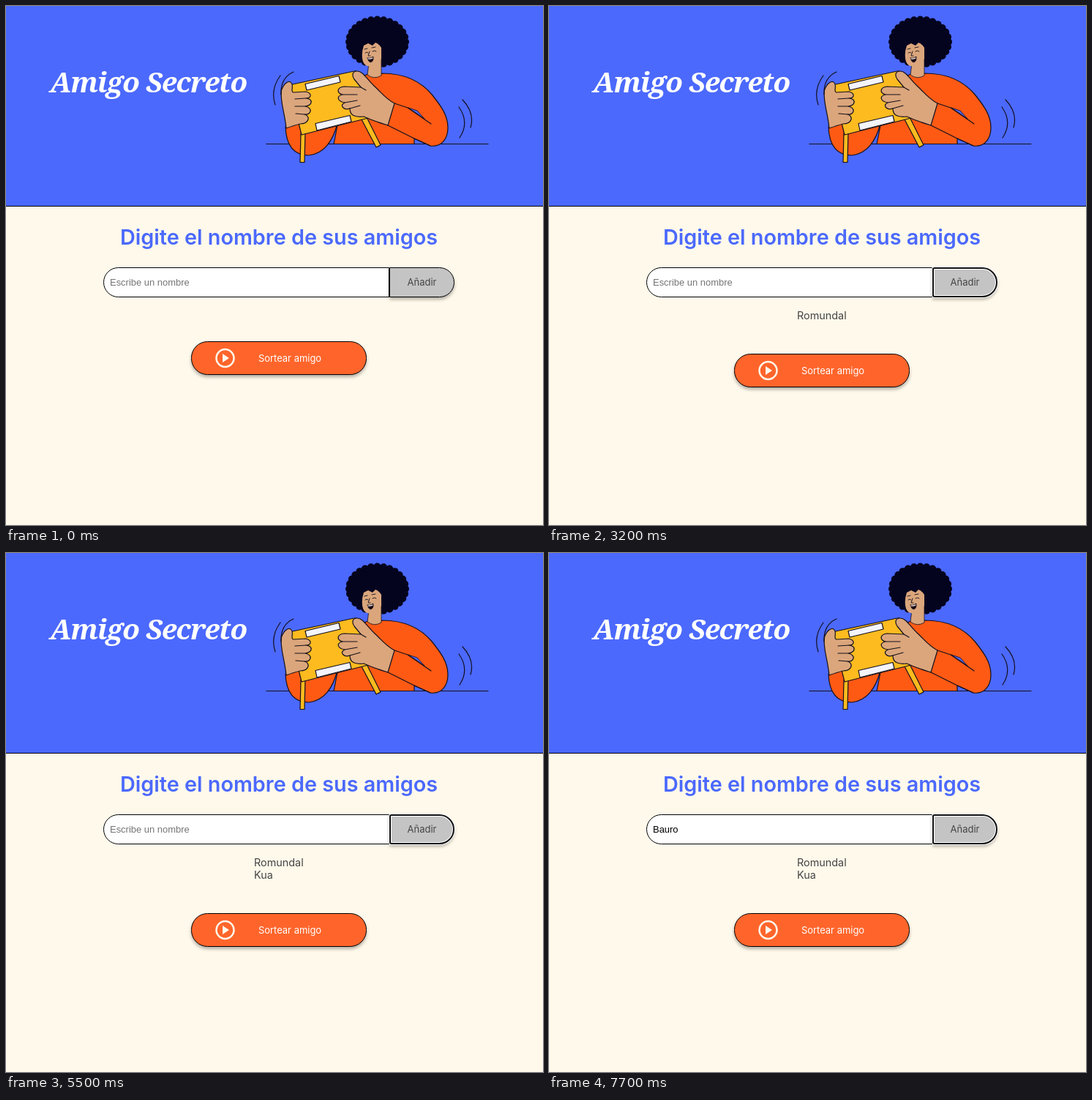
Animation of 734x709 px, one loop 8000 ms. Source, as an HTML page:

```html
<!DOCTYPE html>
<html lang="es">
<head>
<meta charset="utf-8">
<title>Amigo Secreto</title>
<style>
  html, body { margin: 0; width: 100%; height: 100%; overflow: hidden; background: #fff9eb; }
  svg { display: block; width: 734px; height: 709px; }
  text { font-family: Inter, "Noto Sans", sans-serif; font-optical-sizing: none; }
  .title { font: italic 700 39px "Noto Serif", serif; letter-spacing: -1.15px; fill: #fff; }
  .heading { font-size: 28.8px; font-weight: 600; fill: #4b69fd; }
  .label { font-size: 12.96px; }
  .names { font-size: 14.4px; fill: #444; }
  .field { font-family: "Liberation Sans", Arial, sans-serif; font-size: 12.96px; }
  .ghost { font-family: "Liberation Sans", Arial, sans-serif; font-size: 10.7px; }
  .tab { font-family: "Liberation Sans", Arial, sans-serif; font-size: 7.4px; fill: #888; }
  .popup text { font-family: "Open Sans", "Noto Sans", sans-serif; }
  .note { font-size: 9.75px; fill: #666; }
  .saved { font-size: 11px; font-weight: 600; fill: #000; }
  .raised { filter: drop-shadow(0 3px 2px rgba(0, 0, 0, .3)); }
  .art { stroke: #14101c; stroke-width: 1.2; stroke-linejoin: round; stroke-linecap: round; }
  .skin { fill: #dba67c; }
  .shirt { fill: #ff5a14; }
  .box { fill: #fdbb1f; }
  .line { fill: none; }
</style>
</head>
<body>
<svg viewBox="0 0 734 709">
  <rect width="734" height="709" fill="#fff9eb"/>
  <rect width="734" height="273" fill="#4b69fd"/>
  <rect y="273" width="734" height="1" fill="#000"/>
  <text class="title" x="60" y="118">Amigo Secreto</text>

  <g class="art">
    <path class="line" d="M356 188.5H659"/>
    <g id="hair" fill="#05041f" stroke="none"><ellipse cx="507.5" cy="49" rx="39" ry="31"/></g>

    <path class="shirt" d="M382 165C383 194 396 204 414 204C434 202 447 185 453 160L404 150Z"/>
    <path class="shirt" d="M487 96L495 93Q504 100 514 92C548 92 570 106 583 122C594 136 604 149 604 166C604 183 594 193 580 191L558 181V188.500H448L454 158L490 140Z"/>
    <path d="M550 139L562 143L572 154Z" fill="#4b69fd" stroke-width=".8"/>
    <path class="line" d="M531 133L549 139L581 161M522 163L558 181L580 191"/>

    <path class="skin" d="M496 78L494 94Q503 101 513 95V66Z" stroke-width=".8"/>
    <path class="skin" d="M489 54Q485 66 488 76Q491 83 498 82.500Q507 81 510 75L513 72V57Q510 52 505 50L501 54L495 51Z" stroke="none"/>
    <path class="line" d="M491 64Q493 62 495 64M501 62Q504 60 506 62M490 59L494 58M500 57L505 56M497 62L495 68L498 68" stroke-width=".9"/>
    <path d="M494 71Q498 72 502 69Q503 76 498 77Q495 76 494 71Z" fill="#1c0712" stroke-width=".6"/>
    <path d="M495 72Q498 72.500 501 71" stroke="#fff" fill="none"/>

    <path class="box" d="M403 174L402 213.500H408L409 172Z"/>
    <path class="box" d="M486 155L506 193L512 190L493 152Z"/>
    <path class="box" d="M387 108L476 89Q480 88 482 92L495 153L404 176Z"/>
    <path d="M409 106.500L455 95.500L457 104L411 115Z M423 160.500L470 149.500L472 158L425 170Z" fill="#f4f4fb"/>

    <path class="skin" d="M383 167C381 145 374 129 376.500 115C380 105 387 101 390 105C394 110 388 117 393 118L410 117Q417 119 416 123Q415 126 410 126Q418 127 417 132Q416 136 409 137Q417 139 416 144Q414 149 408 148Q414 150 413 155Q411 161 402 161Q394 163 383 167Z"/>
    <path class="line" d="M410 126L395 127M409 137L395 137M408 148L396 147"/>
    <path class="skin" d="M531 133C518 126 512 117 503 109C494 101 488 89 480 89C474 89 472 94 476 100L485 111L462 110Q454 111 454 116Q455 120 460 121Q452 123 455 128Q457 131 463 132Q457 135 461 139Q464 142 470 140Q470 148 476 150Q482 152 489 151C500 156 512 160 522 163Z"/>
    <path class="line" d="M485 111L492 115M460 121L480 121M463 132L480 129M470 140L484 136"/>
    <path class="line" d="M375 95Q361 114 368 135M393 90Q375 98 376 121M624 128Q641 146 635 166M619 138Q634 159 620 180"/>
  </g>

  <text class="heading" x="373" y="326" text-anchor="middle">Digite el nombre de sus amigos</text>

  <path id="input" fill="#fff" stroke="#000"/>
  <g id="inputRing" fill="none"></g>
  <text id="hint" class="field" x="142" y="382" fill="#757575">Escribe un nombre</text>
  <text id="value" class="field" x="142" y="382"></text>
  <rect id="caret" y="370" width="1" height="15"/>
  <g id="ghost">
    <text class="ghost" x="142" y="382"><tspan id="done"></tspan><tspan id="rest" fill="#8a8a8a"></tspan></text>
    <rect x="193.500" y="372.500" width="16" height="11" rx="2" fill="#fff" stroke="#aaa"/>
    <text class="tab" x="201.500" y="381" text-anchor="middle">Tab</text>
  </g>

  <path id="add" class="raised" fill="#c4c4c4" stroke="#000"/>
  <g id="addRing" fill="none"></g>
  <text class="label" x="568.500" y="382" text-anchor="middle" fill="#444">Añadir</text>

  <text id="name1" class="names" x="339" y="428"></text>
  <text id="name2" class="names" x="339" y="445"></text>

  <g id="draw">
    <rect class="raised" x="253.500" y="458.500" width="239" height="45" rx="22" fill="#ff652b" stroke="#000"/>
    <circle cx="299.500" cy="481" r="12" fill="none" stroke="#fff9eb" stroke-width="2.500"/>
    <path d="M296 475L305 481L296 487Z" fill="#fff9eb"/>
    <text class="label" x="388" y="486" text-anchor="middle" fill="#fff">Sortear amigo</text>
  </g>

  <g id="popup" class="popup">
    <rect x="175.500" y="399.500" width="313" height="62" fill="#fff" stroke="#dcdcdc"/>
    <path d="M188 400L196 393L204 400Z" fill="#fff"/>
    <text class="note" x="188" y="421">Información guardada</text>
    <text id="saved" class="saved" x="187.500" y="447"></text>
    <path d="M463.500 411.500L472.500 420.500M472.500 411.500L463.500 420.500" stroke="#111" stroke-width="1.200"/>
  </g>
</svg>
<script>
const LOOP = 8000;
const [FIRST, SECOND, THIRD] = ['Romundal', 'Kua', 'Bauro'];
const $ = id => document.getElementById(id);
const show = (id, on) => $(id).setAttribute('visibility', on ? 'visible' : 'hidden');

function add(parent, tag, attrs) {
  const el = document.createElementNS('http://www.w3.org/2000/svg', tag);
  for (const k in attrs) el.setAttribute(k, attrs[k]);
  parent.append(el);
}

// Box with one corner radius on the left side and another on the right
function pill(x0, y0, x1, y1, l, r) {
  const arc = (rad, dx, dy) => `a${rad} ${rad} 0 0 1 ${dx} ${dy}`;
  return `M${x0 + l} ${y0}H${x1 - r}${arc(r, r, r)}V${y1 - r}${arc(r, -r, r)}` +
         `H${x0 + l}${arc(l, -l, -l)}V${y0 + l}${arc(l, l, -l)}Z`;
}

function ring(id, d) {
  add($(id), 'path', { d, stroke: '#fff', 'stroke-width': 4 });
  add($(id), 'path', { d, stroke: '#101010', 'stroke-width': 2 });
}

$('input').setAttribute('d', pill(133.5, 357.5, 523.5, 397.5, 20, 0));
$('add').setAttribute('d', pill(524.5, 357.5, 612.5, 397.5, 0, 20));
ring('inputRing', pill(134, 358, 523, 397, 19.5, 2));
ring('addRing', pill(525, 358, 612, 397, 2, 19.5));

for (let i = 0; i < 28; i++) {
  const a = i / 28 * Math.PI * 2;
  add($('hair'), 'circle', { cx: 507.5 + 38.5 * Math.cos(a), cy: 49 + 30.5 * Math.sin(a), r: 5 });
}

$('saved').textContent = FIRST;
$('name1').textContent = FIRST;
$('name2').textContent = SECOND;

const open = { focus: 'input', popup: 1, caret: 1 };
const press = { focus: 'add', caret: 0 };
const steps = [
  [0, { text: '', focus: '', popup: 0, caret: 0, ghost: 0, names: 0 }],
  [1100, open],
  [1600, { text: FIRST[0] }],
  [1700, { ghost: 1 }],
  ...[2, 3, 4, 5, 6, 8].map((n, i) => [1900 + i * 100, { ghost: n }]),
  [2600, { ghost: 0, text: FIRST, popup: 0 }],
  [2800, press],
  [3200, { text: '', names: 1 }],
  [3900, open],
  [4400, { text: SECOND[0] }],
  [4500, { popup: 0 }],
  [4700, { text: SECOND.slice(0, 2) }],
  [4800, { text: SECOND }],
  [5000, press],
  [5500, { text: '', names: 2 }],
  [6200, open],
  [6700, { caret: 0 }],
  [7000, { text: THIRD[0], caret: 1 }],
  [7100, { text: THIRD.slice(0, 2), popup: 0 }],
  ...[3, 4, 5].map((n, i) => [7300 + i * 100, { text: THIRD.slice(0, n) }]),
  [7700, press]
];

function render(t) {
  const s = {};
  for (const [at, change] of steps) if (at <= t) Object.assign(s, change);
  const value = $('value');
  value.textContent = s.text;
  show('hint', !s.text);
  show('value', s.text && !s.ghost);
  show('ghost', s.ghost);
  $('done').textContent = FIRST.slice(0, s.ghost);
  $('rest').textContent = FIRST.slice(s.ghost);
  const width = s.text ? value.getComputedTextLength() : 0;
  $('caret').setAttribute('x', Math.floor(142 + width));
  show('caret', s.caret && !s.ghost);
  show('inputRing', s.focus === 'input');
  show('addRing', s.focus === 'add');
  show('popup', s.popup);
  show('name1', s.names > 0);
  show('name2', s.names > 1);
  $('draw').setAttribute('transform', `translate(0 ${17 * s.names})`);
}

const start = performance.now();
function tick() {
  render((performance.now() - start) % LOOP);
  requestAnimationFrame(tick);
}
tick();
</script>
</body>
</html>
```
